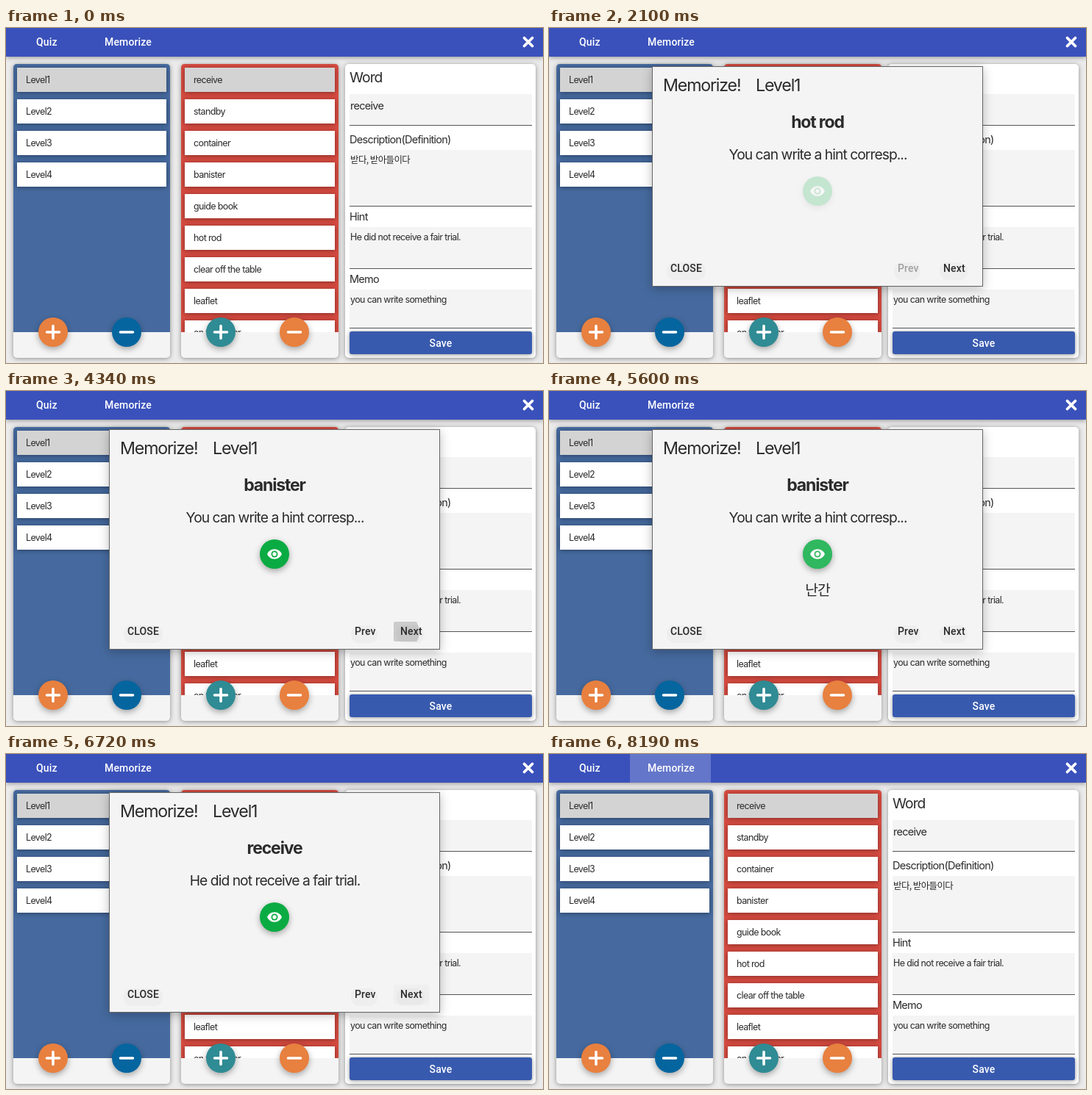
Animation, 730 px wide and 456 px high, one loop 9.03 s. Source, as an HTML page:

```html
<!DOCTYPE html>
<html lang="en">
<head>
<meta charset="utf-8">
<title>Word trainer</title>
<style>
html, body { margin: 0; width: 100%; height: 100%; overflow: hidden; background: #ebebeb; }
svg { display: block; width: 730px; height: 456px; }
text { font-family: Inter, "Noto Sans CJK KR", "Noto Sans CJK", sans-serif; letter-spacing: -.05em; fill: #2b2b2b; white-space: pre; }
.btn { font: 500 14px Roboto, sans-serif; letter-spacing: .01em; }
.ko { font-family: "Noto Sans CJK KR", "Noto Sans CJK", sans-serif; }
.light { fill: #fff; }
.mid { text-anchor: middle; }
.soft { filter: drop-shadow(0 1px 3px #0006); }
.fab { filter: drop-shadow(0 3px 4px #0005); }
</style>
</head>
<body>
<svg id="stage" viewBox="0 0 730 456">
  <defs>
    <clipPath id="listClip"><rect x="238" y="49" width="214" height="365"/></clipPath>
    <clipPath id="menuClip"><rect x="110" width="110" height="39"/></clipPath>
    <clipPath id="eyeClip"><circle cx="365" cy="222" r="20"/></clipPath>
    <clipPath id="nextClip"><rect id="nextBox" x="527" y="314" width="48" height="27" rx="2"/></clipPath>
  </defs>
  <g id="app"></g>
  <g clip-path="url(#menuClip)">
    <circle id="menuRipple" cx="166" cy="20" fill="#fff"/>
    <rect id="menuFocus" x="110" width="110" height="39" fill="#fff"/>
  </g>
  <g id="menu"></g>
  <g id="dialog">
    <rect x="140.5" y="52.5" width="449" height="299" fill="#f4f4f4" stroke="#666" style="filter:drop-shadow(0 3px 7px #0004)"/>
    <g id="halos" fill="#eee"></g>
    <g id="eye">
      <circle class="fab" cx="365" cy="222" r="20" fill="#0bab43"/>
      <g transform="translate(354.2 211.2) scale(.9)">
        <path d="M12 4.5C7 4.5 2.7 7.6 1 12c1.7 4.4 6 7.5 11 7.5s9.3-3.1 11-7.5c-1.7-4.4-6-7.5-11-7.5z" fill="#fff"/>
        <circle cx="12" cy="12" r="5" fill="#0bab43"/>
        <circle cx="12" cy="12" r="3" fill="#fff"/>
      </g>
      <g clip-path="url(#eyeClip)"><circle id="eyeRipple" cx="365" cy="222" fill="#fff"/></g>
    </g>
    <g clip-path="url(#nextClip)"><circle id="nextRipple" cy="328"/></g>
    <g id="labels"></g>
  </g>
</svg>
<script>
const $ = id => document.getElementById(id);

function add(parent, tag, attrs, content = '') {
  const el = document.createElementNS('http://www.w3.org/2000/svg', tag);
  for (const key in attrs) el.setAttribute(key, attrs[key]);
  el.textContent = content;
  return parent.appendChild(el);
}
const rect = (parent, x, y, width, height, fill, more) =>
  add(parent, 'rect', { x, y, width, height, fill, ...more });
const text = (parent, x, y, size, content, cls = '') =>
  add(parent, 'text', { x, y, 'font-size': size, class: cls }, content);

const app = $('app'), menu = $('menu'), labels = $('labels');

function panel(x, width, fill) {
  rect(app, x, 49, width, 400, '#f4f4f4', { rx: 5, class: 'soft' });
  if (fill) add(app, 'path', { d: `M${x} 414V54q0-5 5-5h${width - 10}q5 0 5 5v360z`, fill });
}
function list(x, words, parent) {
  words.forEach((word, i) => {
    const y = 54 + 43 * i;
    rect(parent, x, y, x < 100 ? 203 : 204, 33, i ? '#fff' : '#d3d3d3', { class: 'soft' });
    text(parent, x + 12, y + 21, 12.5, word);
  });
}
function fab(x, fill, plus) {
  add(app, 'circle', { cx: x, cy: 414, r: 20, fill, class: 'fab' });
  add(app, 'path', {
    d: `M${x - 8.5} 414h17` + (plus ? `M${x} 405.5v17` : ''),
    stroke: '#fff', 'stroke-width': 3.6, 'stroke-linecap': 'round'
  });
}
function field(y, height, label, labelY, labelSize, value, size, cls) {
  text(app, 467, labelY, labelSize, label);
  rect(app, 467, y, 248, height, '#f4f4f4');
  rect(app, 467, y + height - 1, 248, 1, '#555');
  text(app, 468, y + (size > 13 ? 21 : 18), size, value, cls);
}

panel(10, 213, '#466a9f');
list(15, ['Level1', 'Level2', 'Level3', 'Level4'], app);
panel(238, 214, '#d64b40');
list(243, ['receive', 'standby', 'container', 'banister', 'guide book', 'hot rod',
  'clear off the table', 'leaflet', 'on the other'], add(app, 'g', { 'clip-path': 'url(#listClip)' }));
fab(64, '#e8803f', true);
fab(164, '#05659f');
fab(292, '#2f8b94', true);
fab(392, '#e8803f');

rect(app, 461, 49, 259, 400, '#fff', { rx: 5, class: 'soft' });
field(90, 43, 'Word', 74, 19.3, 'receive', 14.5);
field(166, 77, 'Description(Definition)', 157, 14.5, '받다, 받아들이다', 12.5, 'ko');
field(271, 57, 'Hint', 262, 14.5, 'He did not receive a fair trial.', 12.5);
field(356, 53, 'Memo', 347, 14.5, 'you can write something', 12.5);
rect(app, 467, 413, 248, 31, '#385aae', { rx: 3, class: 'soft' });
text(app, 591, 434, 14, 'Save', 'btn light mid');

rect(app, 0, 0, 730, 39, '#3a51bb', { class: 'soft' });
text(menu, 41, 24, 14, 'Quiz', 'btn light');
text(menu, 134, 24, 14, 'Memorize', 'btn light');
add(menu, 'path', { d: 'M704.5 13.5l11 11m0-11l-11 11', stroke: '#fff', 'stroke-width': 3.8, 'stroke-linecap': 'round' });

text(labels, 155, 86, 23.2, 'Memorize!');
text(labels, 281, 86, 23.2, 'Level1');
const word = text(labels, 365, 136, 23, '', 'mid');
word.setAttribute('font-weight', 700);
const hint = text(labels, 365.5, 179, 19.3, '', 'mid');
const meaning = text(labels, 365, 278, 19.3, '', 'mid ko');
text(labels, 165, 332, 14, 'CLOSE', 'btn');
const prev = text(labels, 474, 332, 14, 'Prev', 'btn');
const next = text(labels, 536, 332, 14, '', 'btn');
const halos = [[160, 53], [469, 36], [531, 38]].map(([x, w]) =>
  rect($('halos'), x, 319, w, 24, '#eee', { rx: 11 }));

const noHint = 'You can write a hint corresp...';
// start, word, hint, meaning, time the meaning is revealed
const cards = [
  [980, 'hot rod', noHint, '개조된 자동차', 3080],
  [4340, 'banister', noHint, '난간', 5110],
  [6230, 'receive', 'He did not receive a fair trial.', '', Infinity],
  [7210, 'standby', 'He was put on standby for t...', '', Infinity]
];

const ramp = (t, from, to) => Math.min(1, Math.max(0, (t - from) / (to - from)));

// each press: start, start radius, full at, fades from, gone at
function ripple(el, t, radius, alpha, presses) {
  const press = presses.findLast(p => t >= p[0]);
  const [start, r0, full, fade, gone] = press || [0, 0, 1, 0, 1];
  el.setAttribute('r', r0 + (radius - r0) * ramp(t, start, full));
  el.setAttribute('opacity', press ? alpha * (1 - ramp(t, fade, gone)) : 0);
}

function draw(now) {
  const t = Math.floor(now % 9030 / 70) * 70;
  const open = t >= 980 && t < 7840;
  $('dialog').style.display = open ? '' : 'none';
  ripple($('menuRipple'), t, 62, .21, [[980, 37, 1190, 1120, 1540]]);
  $('menuFocus').setAttribute('opacity', .21 * ramp(t, 7770, 8190));

  if (open) {
    const card = cards.findLast(c => t >= c[0]);
    const last = card === cards[3];
    word.textContent = card[1];
    hint.textContent = card[2];
    meaning.textContent = t >= card[4] ? card[3] : '';
    next.textContent = last ? 'Complete' : 'Next';
    next.setAttribute('x', last ? 505 : 536);
    prev.setAttribute('x', last ? 443 : 474);
    prev.style.fill = card === cards[0] ? '#a0a0a0' : '';
    halos[1].setAttribute('x', last ? 438 : 469);
    halos[2].setAttribute('x', last ? 500 : 531);
    halos[2].setAttribute('width', last ? 70 : 38);

    $('eye').setAttribute('opacity', ramp(t, 2030, 2380));
    ripple($('eyeRipple'), t, 20, .3, [[3080, 0, 3360, 3360, 3780], [5110, 0, 5390, 5390, 5810]]);
    const left = last ? 496 : 527;
    $('nextBox').setAttribute('x', left);
    $('nextRipple').setAttribute('cx', left + 10);
    ripple($('nextRipple'), t, 42, .17, [
      [4340, 25, 4410, 4340, 4480], [5950, 6, 6160, 6230, 6790], [6860, 6, 7070, 7140, 7350]]);
    if (last && t >= 7350) $('nextRipple').setAttribute('opacity', .03);
  }
  requestAnimationFrame(draw);
}
requestAnimationFrame(draw);
</script>
</body>
</html>
```
